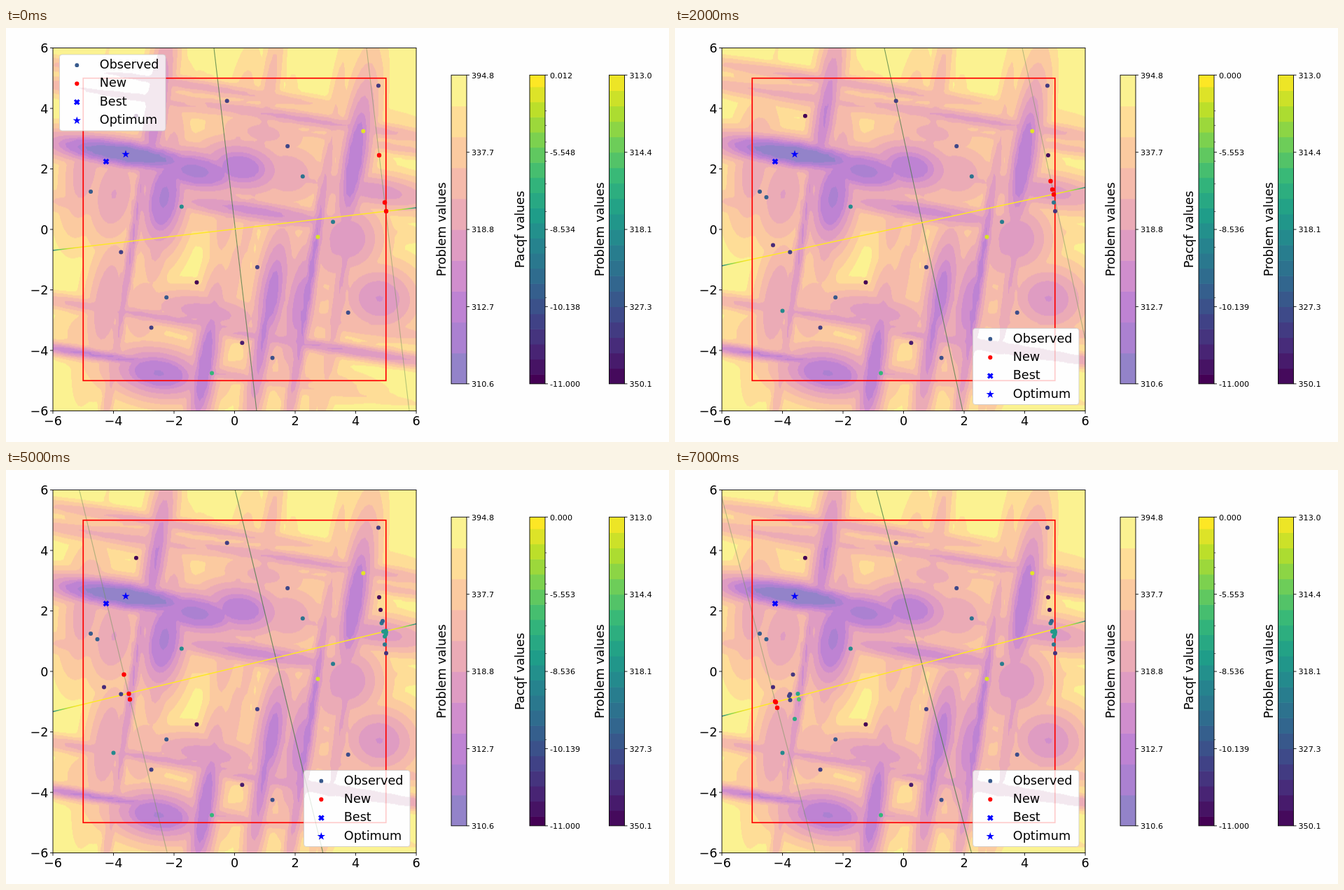
These frames come from a looping animation (947x592 px, 8 s). An HTML page with a canvas:

```html
<!DOCTYPE html>
<html lang="en">
<head>
<meta charset="utf-8">
<title>Search on a multi-peak landscape</title>
<style>
html, body { margin: 0; width: 100%; height: 100%; overflow: hidden; background: #fefefe; }
canvas { display: block; }
</style>
</head>
<body>
<canvas id="stage" width="947" height="592"></canvas>
<script>
const ctx = document.getElementById('stage').getContext('2d');
const STEP_MS = 1000;
const PAPER = '#fefefe';
const plot = { x: 67, y: 28.5, size: 519, unit: 519 / 12 };
const toX = px => (px - plot.x) / plot.unit - 6;
const toY = py => 6 - (py - plot.y) / plot.unit;
const pxX = x => plot.x + (x + 6) * plot.unit;
const pxY = y => plot.y + (6 - y) * plot.unit;

// Colour maps
const parse = text => text.split(' ').map(h => [0, 2, 4].map(i => parseInt(h.substr(i, 2), 16)));
const viridisStops = parse('440154 482878 3e4989 31688e 26828e 1f9e89 35b779 6ece58 b5de2b fde725');
const plasmaStops = parse('0d0887 41049d 6a00a8 8f0da4 b12a90 cc4778 e16462 f2844b fca636 fcce25 f0f921');
function sample(stops, t) {
  const p = Math.min(Math.max(t, 0), 1) * (stops.length - 1);
  const i = Math.min(Math.floor(p), stops.length - 2);
  return stops[i].map((c, k) => Math.round(c + (stops[i + 1][k] - c) * (p - i)));
}
const css = rgb => `rgb(${rgb})`;
const viridis = t => css(sample(viridisStops, t));
const BANDS = 10;
const bandColors = Array.from({ length: BANDS }, (_, k) =>
  sample(plasmaStops, (k + 0.5) / BANDS).map(c => Math.round((c + 255) / 2)));
const veilColors = bandColors.map((_, k) => k <= 5 ? [243, 232, 239] : [254, 254, 254]);

// Seeded shuffle generator
function uniform(count, seed) {
  const M = 2147483647, table = [], out = [];
  let state = seed;
  const next = () => state = state * 16807 % M;
  for (let i = 39; i >= 0; i--) {
    next();
    if (i < 32) table[i] = state;
  }
  let value = table[0];
  for (let i = 0; i < count; i++) {
    const slot = Math.floor(value / 67108865);
    value = table[slot];
    table[slot] = next();
    out.push(value / M);
  }
  return out;
}
function normal(count, seed) {
  const u = uniform(2 * count, seed);
  return u.slice(0, count).map((v, i) =>
    Math.sqrt(-2 * Math.log(v)) * Math.cos(2 * Math.PI * u[count + i]));
}
const argsort = list => list.map((_, i) => i).sort((a, b) => list[a] - list[b]);

// Landscape: the upper envelope of 101 rotated Gaussian peaks
const SEED = 21, PEAKS = 101, FLOOR = 310.63;
function rotation() {
  const [a, b, c, d] = normal(4, SEED);
  const n = Math.hypot(a, b), ux = a / n, uy = b / n;
  const dot = c * ux + d * uy, vx = c - dot * ux, vy = d - dot * uy, m = Math.hypot(vx, vy);
  return (x, y) => [ux * x + vx / m * y, uy * x + vy / m * y];
}
const rotate = rotation();
function makePeaks() {
  const order = argsort(uniform(PEAKS - 1, SEED));
  const place = uniform(2 * PEAKS, SEED).map(u => 10 * u - 5);
  return Array.from({ length: PEAKS }, (_, i) => {
    const shrink = i ? 1 : 0.8;
    const condition = i ? 1000 ** (order[i - 1] / (PEAKS - 2)) : Math.sqrt(1000);
    return {
      at: rotate(place[2 * i] * shrink, place[2 * i + 1] * shrink),
      logHeight: Math.log(i ? 1.1 + 8 * (i - 1) / (PEAKS - 2) : 10),
      scale: argsort(uniform(2, SEED + 1000 * i)).map(k => condition ** (k - 0.5))
    };
  });
}
const peaks = makePeaks();
function height(x, y) {
  const [u, v] = rotate(x, y);
  let best = -Infinity;
  for (const { at, logHeight, scale } of peaks) {
    const q = scale[0] * (u - at[0]) ** 2 + scale[1] * (v - at[1]) ** 2;
    best = Math.max(best, logHeight - q / 4);
  }
  const gap = Math.max(10 - Math.exp(best), 1e-9), w = 10 * Math.log(gap);
  const wavy = gap * Math.exp(0.049 * (Math.sin(w) + Math.sin(0.79 * w)));
  const outside = c => Math.max(0, Math.abs(c) - 5) ** 2;
  return wavy ** 2 + outside(x) + outside(y);
}

// Contour bands, interpolated from a regular grid
const GRID = 100;
const grid = Array.from({ length: GRID }, (_, j) => Array.from({ length: GRID }, (_, i) =>
  height(-6 + 12 * i / (GRID - 1), 6 - 12 * j / (GRID - 1))));
function bandAt(fx, fy) {
  const i = Math.min(Math.floor(fx), GRID - 2), j = Math.min(Math.floor(fy), GRID - 2);
  const s = fx - i, t = fy - j;
  const value = (grid[j][i] * (1 - s) + grid[j][i + 1] * s) * (1 - t)
    + (grid[j + 1][i] * (1 - s) + grid[j + 1][i + 1] * s) * t;
  return Math.min(BANDS - 1, Math.floor(BANDS * Math.log(1 + value) / Math.log(85.2)));
}
function paintField(colors) {
  const n = plot.size, layer = document.createElement('canvas');
  layer.width = layer.height = n;
  const c = layer.getContext('2d'), image = c.createImageData(n, n);
  const step = (GRID - 1) / n;
  for (let y = 0, p = 0; y < n; y++) {
    for (let x = 0; x < n; x++, p += 4) {
      image.data.set(colors[bandAt((x + 0.5) * step, (y + 0.5) * step)], p);
      image.data[p + 3] = 255;
    }
  }
  c.putImageData(image, 0, 0);
  return layer;
}
const field = paintField(bandColors), veil = paintField(veilColors);

// Samples
const dotColor = ([px, py]) => {
  const value = FLOOR + height(toX(px), toY(py)) - 313;
  return viridis(1 - Math.log(1 + Math.max(0, value)) / Math.log(38.1));
};
const withColor = at => ({ at, color: dotColor(at) });
const firstDots = [
  [-4.75, 1.25], [-3.75, -0.75], [-1.75, 0.75], [-2.75, -3.25], [-2.25, -2.25],
  [-1.25, -1.75], [-0.75, -4.75], [0.25, -3.75], [1.25, -4.25], [0.75, -1.25],
  [1.75, 2.75], [2.25, 1.75], [-0.25, 4.25], [3.25, 0.25], [2.75, -0.25],
  [3.75, -2.75], [4.25, 3.25], [4.75, 4.75], [-3.25, 3.75]
].map(([x, y]) => withColor([pxX(x), pxY(y)]));

// flat: height of the shallow line at both edges; mid, side: steep lines at half height
const steps = [
  { flat: [318, 257], mid: 327.5, side: 545.5, top: true, fresh: [[533, 182], [541, 249.5], [543, 262]] },
  { flat: [320, 248], mid: 355, side: 136.5, fresh: [[130.5, 242], [140, 310.5], [153.5, 404.5]] },
  { flat: [340, 228], mid: 355, side: 552, fresh: [[536.5, 219], [539, 231], [541, 238]] },
  { flat: [345, 224], mid: 354.5, side: 556, fresh: [[538, 216], [542.5, 235]] },
  { flat: [347, 221], mid: 374.5, side: 556, top: true, fresh: [[535, 200], [542.5, 230], [543, 232]] },
  { flat: [345.5, 220], mid: 390, side: 167.5, fresh: [[168.5, 292.5], [175.5, 320], [177, 328]] },
  { flat: [350, 218], mid: 372, side: 154.5, fresh: [[163, 323], [164.5, 329], [171, 356]] },
  { flat: [352, 216], mid: 355.5, side: 132, fresh: [[143, 331], [144, 332], [146, 340]] }
];
for (const s of steps) s.dots = s.fresh.map(withColor);

// Drawing helpers
function stroke(color, width, ...points) {
  ctx.strokeStyle = color;
  ctx.lineWidth = width;
  ctx.beginPath();
  points.forEach(([x, y]) => ctx.lineTo(x, y));
  ctx.stroke();
}
function dot([x, y], color, r = 3) {
  ctx.fillStyle = color;
  ctx.beginPath();
  ctx.arc(x, y, r, 0, 2 * Math.PI);
  ctx.fill();
}
function label(text, x, y, size, align = 'left') {
  ctx.font = `${size}px "DejaVu Sans", sans-serif`;
  ctx.textAlign = align;
  ctx.fillStyle = '#000';
  ctx.fillText(text, x, y);
}
function star(x, y) {
  ctx.fillStyle = '#00f';
  ctx.beginPath();
  for (let k = 0; k < 10; k++) {
    const r = k % 2 ? 2.3 : 6, a = k * Math.PI / 5;
    ctx.lineTo(x + r * Math.sin(a), y - r * Math.cos(a));
  }
  ctx.fill();
}
function cross(x, y) {
  for (const d of [-1, 1]) stroke('#00f', 3.3, [x - 3.2, y - 3.2 * d], [x + 3.2, y + 3.2 * d]);
}

function shallowColor() {
  const g = ctx.createLinearGradient(plot.x, 0, plot.x + plot.size, 0);
  for (let d = 0; d <= 1; d += 0.25) {
    const c = viridis(Math.log(12 - 9 * d * d) / Math.log(12));
    g.addColorStop((1 - d) / 12, c);
    g.addColorStop((11 + d) / 12, c);
  }
  return g;
}
const lineColor = shallowColor();

function contents(index, layer, alpha) {
  const { flat, mid, side, fresh } = steps[index];
  const { x, y, size } = plot, slope = (flat[0] - flat[1]) / size, half = slope * size / 2;
  ctx.drawImage(layer, x, 28.5, size, size);
  ctx.globalAlpha = alpha;
  ctx.save();
  ctx.beginPath();
  ctx.rect(x, y, size, size);
  ctx.clip();
  stroke('rgba(110,150,90,.5)', 1.1, [side - half, y], [side + half, y + size]);
  stroke('rgba(65,120,65,.75)', 1.1, [mid - half, y], [mid + half, y + size]);
  stroke(lineColor, 1.6, [x, flat[0]], [x + size, flat[1]]);
  ctx.restore();
  ctx.strokeStyle = '#f00';
  ctx.lineWidth = 1.7;
  ctx.strokeRect(pxX(-5), pxY(5), 10 * plot.unit, 10 * plot.unit);
  const seen = firstDots.concat(...steps.slice(0, index).map(s => s.dots));
  seen.forEach(d => dot(d.at, d.color));
  fresh.forEach(p => dot(p, '#f00', 3.2));
  cross(143, 191);
  star(171, 180.5);
  ctx.globalAlpha = 1;
}

function legend(index) {
  const [x, y] = steps[index].top ? [76.5, 38] : [425.5, 429.5];
  ctx.save();
  ctx.beginPath();
  ctx.roundRect(x, y, 151.5, 109, 3.5);
  ctx.clip();
  contents(index, veil, 0.2);
  ctx.restore();
  ctx.strokeStyle = 'rgba(204,204,204,.8)';
  ctx.lineWidth = 1;
  ctx.beginPath();
  ctx.roundRect(x, y, 151.5, 109, 3.5);
  ctx.stroke();
  const row = k => y + 15.2 + 26.4 * k, mx = x + 24.8;
  dot([mx, row(0)], viridis(0.28), 2.9);
  dot([mx, row(1)], '#f00', 3.1);
  cross(mx, row(2));
  star(mx, row(3));
  ['Observed', 'New', 'Best', 'Optimum'].forEach((t, k) => label(t, x + 57.3, row(k) + 4.8, 17.6));
}

function axes() {
  const { x, y, size } = plot;
  ctx.strokeStyle = '#000';
  ctx.lineWidth = 0.9;
  ctx.strokeRect(x, y, size, size);
  for (let v = -6; v <= 6; v += 2) {
    const text = String(v).replace('-', '\u2212');
    stroke('#000', 0.9, [pxX(v), y + size], [pxX(v), y + size + 4]);
    stroke('#000', 0.9, [x - 4, pxY(v)], [x, pxY(v)]);
    label(text, pxX(v), 567.5, 17.6, 'center');
    label(text, x - 6.5, pxY(v) + 6.5, 17.6, 'right');
  }
}

function colorBar(x, title, ticks, colors, shift = 0) {
  const top = 67.3, h = 441.5, n = colors.length, cell = h / (n - (shift ? 0.6 : 0));
  ctx.save();
  ctx.beginPath();
  ctx.rect(x, top, 22, h);
  ctx.clip();
  colors.forEach((c, k) => {
    ctx.fillStyle = c;
    ctx.fillRect(x, top + h + shift - (k + 1) * cell, 22, cell + 0.6);
  });
  ctx.restore();
  ctx.strokeStyle = '#000';
  ctx.lineWidth = 0.9;
  ctx.strokeRect(x, top, 22, h);
  ticks.forEach((t, k) => {
    const y = top + h * k / 4;
    stroke('#000', 0.9, [x + 22, y], [x + 26, y]);
    label(t, x + 29, y + 4.2, 11.2);
  });
  ctx.save();
  ctx.translate(x - 8, 288);
  ctx.rotate(-Math.PI / 2);
  label(title, 0, 0, 17.6, 'center');
  ctx.restore();
}

const warmBar = bandColors.map(css);
const coolBar = Array.from({ length: 20 }, (_, k) => viridis((k + 0.5) / 20));
const shiftedBar = Array.from({ length: 21 }, (_, k) => viridis(k / 20));
function colorBars(index) {
  const scores = index
    ? ['0.000', '-5.553', '-8.536', '-10.139', '-11.000']
    : ['0.012', '-5.548', '-8.534', '-10.138', '-11.000'];
  colorBar(636, 'Problem values', ['394.8', '337.7', '318.8', '312.7', '310.6'], warmBar);
  colorBar(748, 'Pacqf values', scores, shiftedBar, 8);
  for (let k = 2; k < 10; k++) {
    const y = 508.8 - 441.5 * Math.log(k) / Math.log(12);
    stroke('#000', 0.6, [770, y], [772.3, y]);
  }
  colorBar(861.5, 'Problem values', ['313.0', '314.4', '318.1', '327.3', '350.1'], coolBar);
}

function draw() {
  const index = Math.floor(performance.now() / STEP_MS) % steps.length;
  ctx.fillStyle = PAPER;
  ctx.fillRect(0, 0, 947, 592);
  contents(index, field, 1);
  axes();
  legend(index);
  colorBars(index);
  requestAnimationFrame(draw);
}
draw();
</script>
</body>
</html>
```
